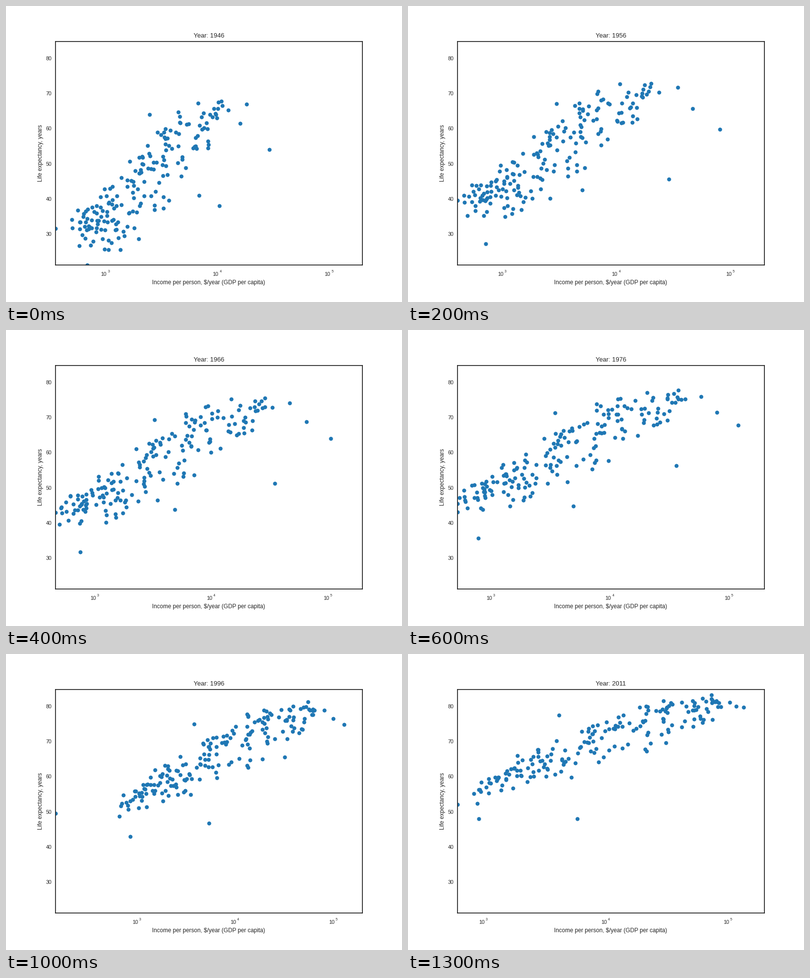
A matplotlib script that plays this animation: 800x600 px, repeating every 1.4 s.

```python
import matplotlib.pyplot as plt
import numpy as np
from matplotlib.animation import FuncAnimation

plt.rcParams["font.family"] = "Liberation Sans"

W, H, DPI = 800, 600, 100
LEFT, RIGHT, TOP, BOTTOM = 100, 720, 72, 525
INK, BLUE = "#262626", "#1f77b4"
FRAMES, INTERVAL = 14, 100
START, STEP = 1946, 5
LIFE_MIN, LIFE_MAX = 21.15, 84.77
LOG_MAX = np.log10(200000)

# Log income of the poorest country, which sets the left edge of the plot.
EDGE_YEARS = [1946, 1976, 1986, 1991, 1996, 2001, 2011]
EDGE_INCOME = [2.557, 2.723, 2.582, 2.55, 2.178, 2.7, 2.791]

# Outliers: first and last log income, boom in between, first and last life.
STRAYS = np.array([
    [4.47, 5.13, .36, 54.0, 79.7],
    [4.21, 5.07, .35, 61.5, 80.0],
    [4.02, 4.46, .40, 38.0, 72.0],
    [3.84, 3.77, -.13, 41.0, 48.0],
    [3.40, 3.62, .05, 64.0, 77.5],
    [2.84, 2.965, 0, 21.2, 48.0]])

COUNT = 178
rng = np.random.default_rng(12)
wealth = rng.uniform(0, 1, COUNT)
health = rng.triangular(-1.3, .3, 1.1, COUNT)
phase = rng.uniform(0, 2 * np.pi, (2, COUNT))


def lerp(a, b, t):
    return a + (b - a) * t


def cloud(t):
    """Incomes widen with time; life rises early and flattens for the rich."""
    progress = t ** .6
    w = 2 * wealth - 1
    deviation = 1.3 * w + .3 * w ** 3 + (1 - t) * wealth ** 10
    income = lerp(3.31, 4, t) + lerp(.36, .66, progress) * deviation
    income += .04 * np.sin(phase[0] + 4 * t)

    curve = wealth ** lerp(1.8, .75, progress)
    middle = lerp(32, 55, progress) + lerp(34, 26, progress) * curve
    spread = lerp(13, 7, progress) * (.35 + .65 * np.sin(np.pi * wealth))
    return income, middle + spread * (health + .1 * np.sin(phase[1] + 4 * t))


def strays(t):
    first, last, boom, young, old = STRAYS.T
    income = lerp(first, last, t) + boom * np.sin(np.pi * t ** .5)
    return income, lerp(young, old, t ** .8)


fig = plt.figure(figsize=(W / DPI, H / DPI), dpi=DPI, facecolor="white")
ax = fig.add_axes([LEFT / W, 1 - BOTTOM / H, (RIGHT - LEFT) / W, (BOTTOM - TOP) / H])
ax.set(xticks=[], yticks=[], ylim=(LIFE_MIN, LIFE_MAX))
for spine in ax.spines.values():
    spine.set(color=INK, linewidth=1.25)


def label(x, y, text, size, **style):
    """Text with its baseline at a pixel position."""
    return fig.text(x / W, 1 - y / H, text, size=size, color=INK,
                    va="baseline", **style)


title = label(410, 64, "", 9.27, ha="center")
label(409.7, 564, r"Income per person, \$/year (GDP per capita)", 8.5, ha="center")
label(72.5, 298.5, "Life expectancy, years", 8.5, ha="center",
      rotation=90, rotation_mode="anchor")
for value in range(30, 90, 10):
    y = BOTTOM - (value - LIFE_MIN) / (LIFE_MAX - LIFE_MIN) * (BOTTOM - TOP)
    label(92.3, y + 4, str(value), 7.7, ha="right")
powers = [(e, label(0, 547, "10", 7.7), label(0, 539.5, str(e), 5)) for e in (3, 4, 5)]
dots, = ax.plot([], [], "o", color=BLUE, markersize=5.8, markeredgewidth=0)


def update(frame):
    year, t = START + STEP * frame, frame / (FRAMES - 1)
    edge = np.interp(year, EDGE_YEARS, EDGE_INCOME)
    poorest = [edge], [lerp(31.5, 52, t ** .5)]
    dots.set_data(*np.hstack([cloud(t), strays(t), poorest]))
    ax.set_xlim(edge, LOG_MAX)
    scale = (RIGHT - LEFT) / (LOG_MAX - edge)
    for exponent, base, raised in powers:
        x = RIGHT - (LOG_MAX - exponent) * scale
        base.set_x((x - 8.4) / W)
        raised.set_x((x + 5.4) / W)
    title.set_text(f"Year: {year}")
    return dots, title


animation = FuncAnimation(fig, update, frames=FRAMES, interval=INTERVAL, repeat=True)
plt.show()
```
